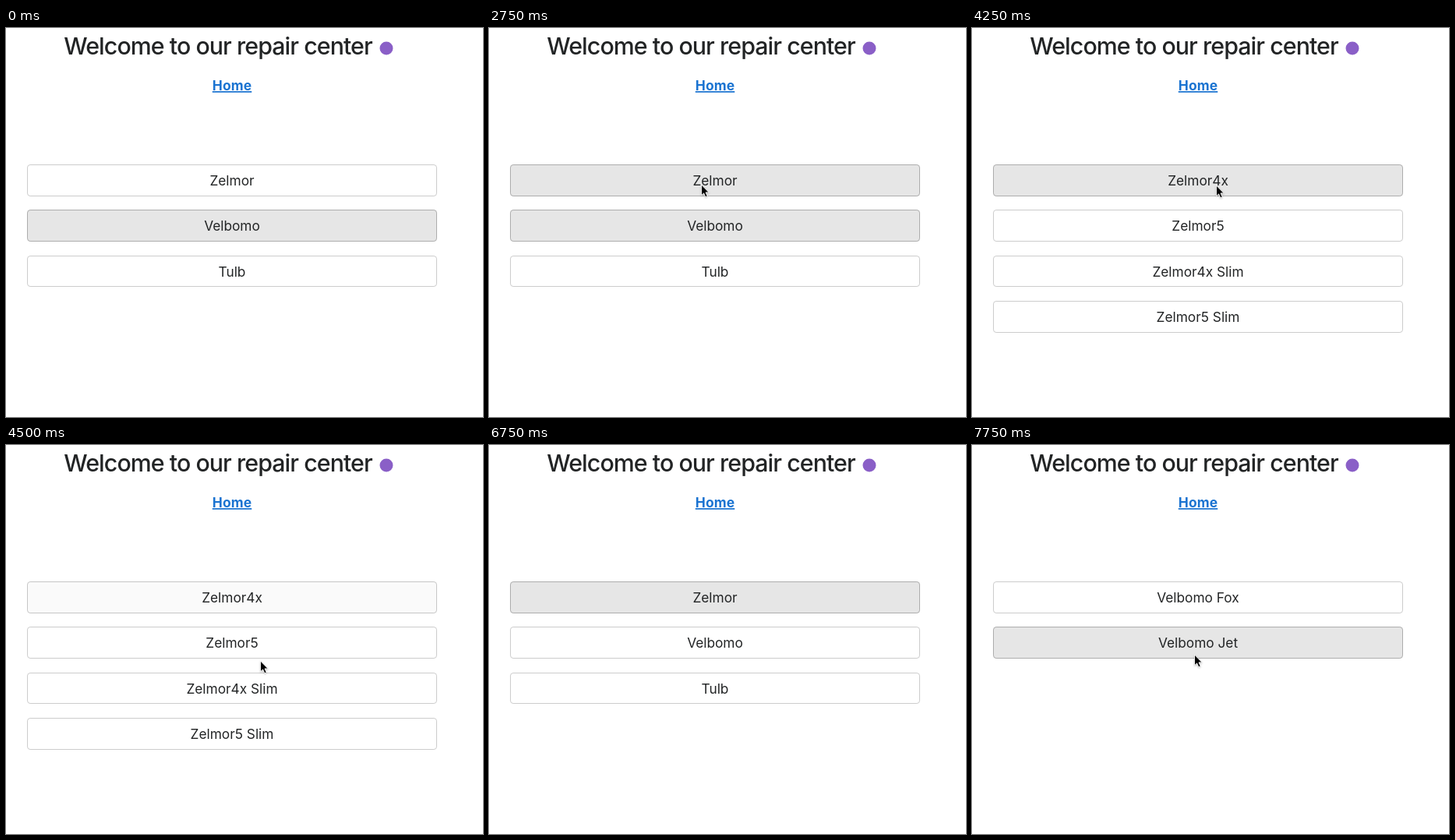
An HTML page for the animation above (8 s loop, 612 by 499 pixels).

```html
<!DOCTYPE html>
<html lang="en">
<head>
<meta charset="utf-8">
<title>Repair center</title>
<style>
  html, body { margin: 0; width: 100%; height: 100%; overflow: hidden; background: #fff; }
  svg { display: block; width: 612px; height: 499px; font-family: Inter, "Open Sans", sans-serif; font-optical-sizing: none; }
  text { text-anchor: middle; fill: #222425; }
  .title { font-size: 30.3px; font-weight: 500; letter-spacing: -.92px; }
  .link { font-size: 17.4px; font-weight: 700; letter-spacing: .15px; fill: #1a73d1; text-decoration: underline; }
  .row text { font-size: 17.3px; }
  .cursor { filter: drop-shadow(0 1px 1px rgba(0, 0, 0, .25)); }
</style>
</head>
<body>
<svg viewBox="0 0 612 499">
  <text class="title" x="272" y="34.3">Welcome to our repair center</text>
  <circle cx="488" cy="26" r="8.5" fill="#8a5fc7"/>
  <text class="link" x="290" y="80">Home</text>
  <g id="rows"></g>
  <path id="cursor" class="cursor" d="M.5 0V13.7L3.6 10.9L5.8 15.8L8.2 14.7L6 9.9H10.2Z"
        fill="#000" stroke="#fff" stroke-width=".9" stroke-linejoin="round"/>
</svg>
<script>
const LOOP = 8000;
const TICK = 250;
const NS = "http://www.w3.org/2000/svg";

const HOME = ["Zelmor", "Velbomo", "Tulb"];
const PHONES = ["Zelmor4x", "Zelmor5", "Zelmor4x Slim", "Zelmor5 Slim"];
const LAPTOPS = ["Velbomo Fox", "Velbomo Jet"];

const VISITS = [
  { from: 0, list: HOME },
  { from: 3250, list: PHONES },
  { from: 6750, list: HOME },
  { from: 7750, list: LAPTOPS }
];

// Focus switches at once, hover fades over one tick.
const HIGHLIGHTS = [
  { row: 1, from: 0, to: 3250 },
  { row: 0, from: 2500, to: 3250, fade: true },
  { row: 0, from: 3250, to: 4500, fade: true },
  { row: 0, from: 6750, to: 7500 },
  { row: 1, from: 7500, to: LOOP }
];

// The pointer shows from the first to the last time and passes the points evenly.
const STROKES = [
  { from: 750, to: 2000, points: [[572, 215], [538, 222], [233, 280], [302, 204], [291, 197]] },
  { from: 2750, to: 4250, points: [[272, 201]] },
  { from: 4250, to: 5500, points: [[313, 202], [326, 277], [339, 284], [86, 87], [50, 39]] },
  { from: 7000, to: LOOP, points: [[234, 223], [285, 269]] }
];

const easeOut = u => 1 - (1 - u) ** 2;
const mix = (a, b, u) => a + (b - a) * u;
const gray = v => `rgb(${v}, ${v}, ${v})`;

function add(parent, tag, attrs) {
  const el = document.createElementNS(NS, tag);
  for (const key in attrs) el.setAttribute(key, attrs[key]);
  return parent.appendChild(el);
}

function makeRow(i) {
  const top = Math.round(175 + 58.4 * i);
  const bottom = Math.round(215.6 + 58.4 * i);
  const group = add(document.getElementById("rows"), "g", { class: "row" });
  const box = add(group, "rect", { x: 27.5, y: top + .5, width: 525, height: bottom - top - 1, rx: 3.6 });
  const label = add(group, "text", { x: 290, y: top + 27 });
  return { group, box, label };
}

const rows = PHONES.map((_, i) => makeRow(i));
const cursor = document.getElementById("cursor");

function strength({ from, to, fade }, t) {
  if (!fade) return t >= from && t < to ? 1 : 0;
  if (t < from || t >= to + TICK) return 0;
  return t < from + TICK || t >= to ? .2 : 1;
}

function drawRows(t) {
  const { list } = VISITS.findLast(visit => visit.from <= t);
  rows.forEach(({ group, box, label }, i) => {
    const level = Math.max(0, ...HIGHLIGHTS.filter(h => h.row === i).map(h => strength(h, t)));
    group.style.display = list[i] ? "" : "none";
    label.textContent = list[i] || "";
    box.setAttribute("fill", gray(mix(255, 230, level)));
    box.setAttribute("stroke", gray(mix(204, 173, level)));
  });
}

function along(points, u) {
  const pos = u * (points.length - 1);
  const i = Math.floor(pos);
  const next = points[i + 1] || points[i];
  return points[i].map((v, axis) => mix(v, next[axis], easeOut(pos - i)));
}

function drawCursor(t) {
  const stroke = STROKES.find(s => t >= s.from && t < s.to);
  cursor.style.display = stroke ? "" : "none";
  if (!stroke) return;
  const { from, to, points } = stroke;
  const [x, y] = along(points, (t - from) / (to - TICK - from)).map(Math.round);
  cursor.setAttribute("transform", `translate(${x} ${y})`);
}

let shown;
function frame() {
  const t = Math.floor(performance.now() % LOOP / TICK) * TICK;
  if (t !== shown) {
    shown = t;
    drawRows(t);
    drawCursor(t);
  }
  requestAnimationFrame(frame);
}
frame();
</script>
</body>
</html>
```
